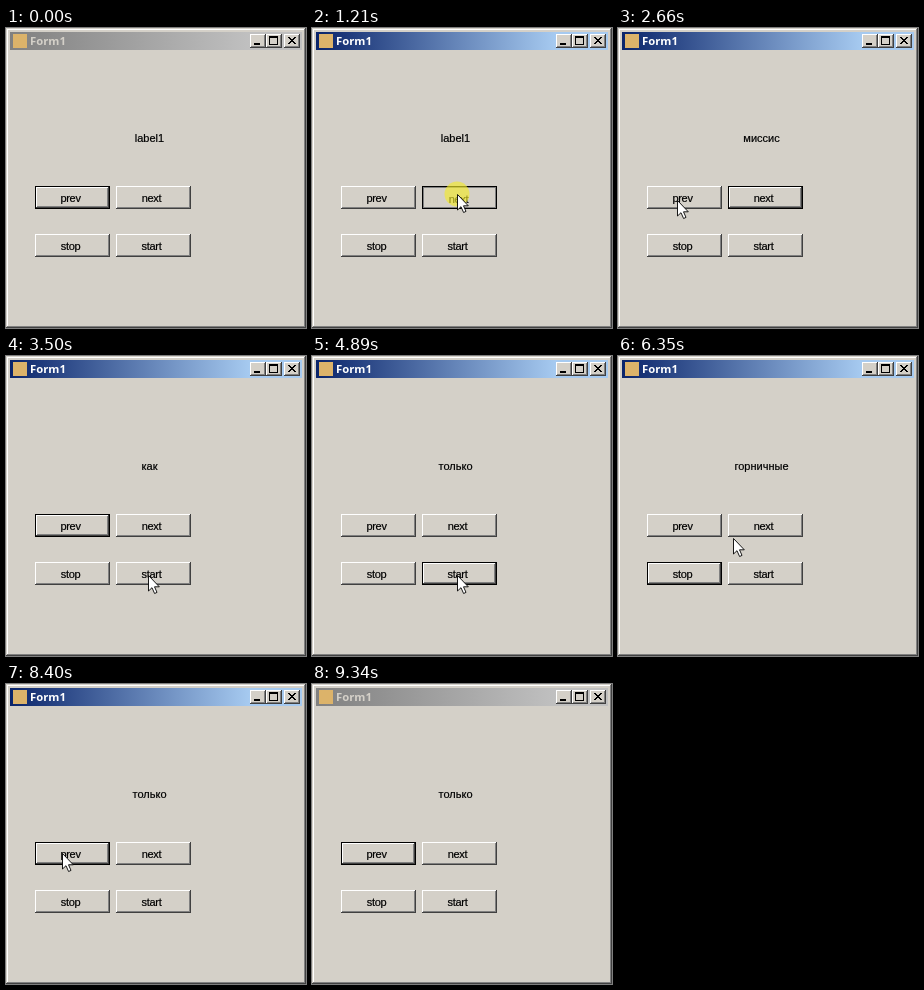
Recreate the animation shown at these times as an HTML page. Size 300 by 300 pixels, loop 9.43 s.

```html
<!DOCTYPE html>
<html lang="ru">
<head>
<meta charset="utf-8">
<title>Form1</title>
<style>
  html, body { margin: 0; width: 100%; height: 100%; overflow: hidden; background: #d4d0c8; }
  svg { display: block; width: 100vw; height: 100vh; }
  text { font: 11px "Liberation Sans", Arial, sans-serif; }
  #label, #buttons text { stroke: #000; stroke-width: .2; }
  #buttons text { letter-spacing: -.3px; }
  #title { font: 700 11.3px "Noto Sans", "Open Sans", sans-serif; }
  .edge { shape-rendering: crispEdges; }
  .line { fill: none; }
  .ring, .sunk, .default .plain, .down .ring .raised { display: none; }
  .default .ring, .down .sunk { display: inline; }
  .down text { transform: translate(1px, 1px); }
</style>
</head>
<body>
<svg viewBox="0 0 300 300">
  <defs>
    <linearGradient id="active"><stop stop-color="#0a246a"/><stop offset=".82" stop-color="#a6caf0"/></linearGradient>
    <linearGradient id="idle"><stop stop-color="#808080"/><stop offset=".82" stop-color="#c0c0c0"/></linearGradient>
  </defs>
  <g class="edge">
    <rect width="300" height="300" fill="#d4d0c8"/>
    <path class="line" stroke="#fff" d="M1.5 298V1.5H298"/>
    <path class="line" stroke="#808080" d="M1 298.5H298.5V1"/>
    <path class="line" stroke="#404040" d="M0 299.5H299.5V0"/>
    <rect id="bar" x="4" y="4" width="292" height="18"/>
    <rect x="7" y="6" width="14" height="14" fill="#dcb36a"/>
    <g id="caption"></g>
    <path d="M248 15h6v2h-6z"/>
    <path d="M263 8h9v9h-9z M264 10v6h7v-6z" fill-rule="evenodd"/>
    <path d="M282 9h2l6 7h-2z M288 9h2l-6 7h-2z"/>
  </g>
  <text id="title" x="24" y="17">Form1</text>
  <text id="label" x="143.5" y="114" text-anchor="middle"></text>
  <g id="buttons"></g>
  <g id="pointer">
    <circle id="halo" r="12.5" fill="#f2ea28" opacity=".64"/>
    <path d="M.5 .5V16L4 12.7 6.6 18.5 9 17.4 6.5 11.8H11.3Z" fill="#fff" stroke="#000" stroke-width=".9"/>
  </g>
</svg>
<script>
const LOOP = 9430, STEP = 47, HOLD = 90, TICK = 500;
const ENTER = 130, LEAVE = 9110, BLUR = 9340;
const $ = id => document.getElementById(id);

// Raised 3D frame of the classic look
const raised = (x, y, w, h) => `<g class="raised line">
  <path stroke="#fff" d="M${x + .5} ${y + h - 1}V${y + .5}H${x + w - 1}"/>
  <path stroke="#808080" d="M${x + 1} ${y + h - 1.5}H${x + w - 1.5}V${y + 1}"/>
  <path stroke="#404040" d="M${x} ${y + h - .5}H${x + w - .5}V${y}"/></g>`;

const box = (x, y, w, h, color) =>
  `<rect class="line" x="${x + .5}" y="${y + .5}" width="${w - 1}" height="${h - 1}" stroke="${color}"/>`;

$('caption').innerHTML = [244, 260, 278].map(x =>
  `<rect x="${x}" y="6" width="16" height="14" fill="#d4d0c8"/>` + raised(x, 6, 16, 14)).join('');

$('buttons').innerHTML = ['prev', 'next', 'stop', 'start'].map((name, i) => {
  const x = 29 + i % 2 * 81, y = 158 + (i >> 1) * 48;
  return `<g id="${name}">
    <g class="edge">
      <g class="plain">${raised(x, y, 75, 23)}</g>
      <g class="ring">${box(x, y, 75, 23, '#000')}${raised(x + 1, y + 1, 73, 21)}
        <g class="sunk">${box(x + 1, y + 1, 73, 21, '#808080')}</g></g>
    </g>
    <text x="${x + 35.5}" y="${y + 16}" text-anchor="middle">${name}</text></g>`;
}).join('');

const words = 'как миссис была только что горничные выбросились'.split(' ');

// The first click only activates the window
const clicks = [
  [1180, 'next'], [1720, 'next'], [2010, 'next'], [2670, 'prev'], [3600, 'start'],
  [6020, 'stop'], [7030, 'next'], [7570, 'prev'], [7750, 'prev'], [8220, 'prev']
];
const FOCUS = clicks[0][0];

// Pointer glides: start, end, x, y
const glides = [
  [130, 880, 134, 177], [1020, 1130, 145, 166], [2380, 2600, 59, 172],
  [2990, 3130, 105, 215], [3310, 3480, 145, 219], [4890, 5780, 72, 220],
  [6200, 6330, 115, 182], [6440, 6580, 140, 178], [7200, 7470, 56, 169],
  [8400, LEAVE, 275, 296]
];

function wordAt(t) {
  let index = -1;
  clicks.slice(1).forEach(([down, name], i, all) => {
    const up = down + HOLD;
    if (t < up) return;
    if (name === 'next') index++;
    if (name === 'prev') index--;
    if (name === 'start') {
      const stop = all[i + 1][0];
      index += 1 + Math.floor((Math.min(t, stop) - up) / TICK);
    }
  });
  return words[index] || 'label1';
}

function pointerAt(t) {
  let x = 239, y = 290;
  for (const [from, to, toX, toY] of glides) {
    const k = Math.min(1, Math.max(0, (t - from) / (to - from)));
    x += (toX - x) * k;
    y += (toY - y) * k;
  }
  return [Math.round(x), Math.round(y)];
}

function draw(t) {
  const active = t >= FOCUS && t < BLUR;
  $('bar').setAttribute('fill', active ? 'url(#active)' : 'url(#idle)');
  $('title').setAttribute('fill', active ? '#fff' : '#d4d0c8');
  $('label').textContent = wordAt(t);

  const [time, name] = clicks.filter(c => c[0] <= t).pop() || [-HOLD, 'prev'];
  const down = t < time + HOLD;
  for (const el of $('buttons').children) {
    el.classList.toggle('default', el.id === name);
    el.classList.toggle('down', el.id === name && down);
  }

  const held = ENTER + Math.floor((t - ENTER) / STEP) * STEP;
  $('pointer').setAttribute('transform', `translate(${pointerAt(held)})`);
  $('pointer').style.display = t >= ENTER && t < LEAVE ? '' : 'none';
  $('halo').style.display = down ? '' : 'none';
}

const start = performance.now();
function tick() {
  draw((performance.now() - start) % LOOP);
  requestAnimationFrame(tick);
}
tick();
</script>
</body>
</html>
```
